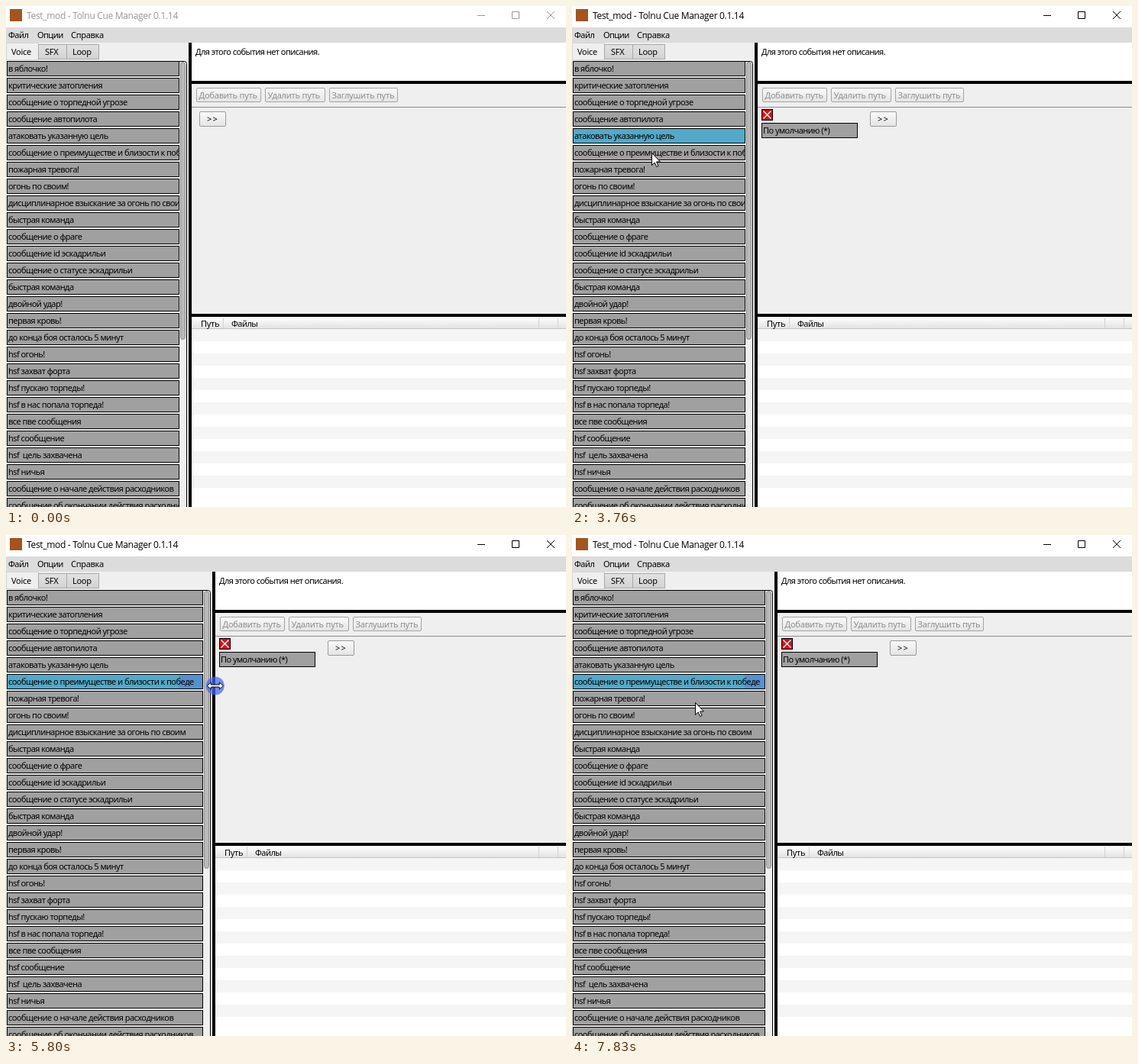
Animation, 733 px wide and 656 px high, one loop 8000 ms. Source, as an HTML page:

```html
<!DOCTYPE html>
<html lang="ru">
<head>
<meta charset="utf-8">
<title>Tolnu Cue Manager</title>
<style>
html, body { margin: 0; width: 100%; height: 100%; overflow: hidden; background: #fff; }
svg { display: block; width: 733px; height: 656px; }
text { font: 11px "Noto Sans", "Open Sans", sans-serif; letter-spacing: -.3px; white-space: pre; }
.title { font: 12px "Open Sans", "Noto Sans", sans-serif; letter-spacing: -.32px; }
.dense { letter-spacing: -.55px; }
.off { fill: #8c8c8c; letter-spacing: -.22px; }
</style>
</head>
<body>
<svg id="stage" viewBox="0 0 733 656">
  <defs>
    <linearGradient id="face" x2="0" y2="1"><stop stop-color="#fafafa"/><stop offset="1" stop-color="#e4e4e4"/></linearGradient>
    <linearGradient id="tab" x2="0" y2="1"><stop stop-color="#e2e2e2"/><stop offset="1" stop-color="#d2d2d2"/></linearGradient>
    <linearGradient id="head" x2="0" y2="1"><stop stop-color="#fff"/><stop offset="1" stop-color="#e3e3e3"/></linearGradient>
    <clipPath id="listClip"><rect id="clipBox" y="70" height="586"/></clipPath>
  </defs>
  <rect width="733" height="656" fill="#fff"/>
  <rect x="5" y="4" width="16" height="16" fill="#a3541f"/>
  <g id="caption">
    <text class="title" x="27" y="17">Test_mod - Tolnu Cue Manager 0.1.14</text>
    <path id="controls" d="M617 12.5h10M662.5 7.5h9v9h-9zM708 7l10 10M718 7l-10 10" fill="none"/>
  </g>
  <rect y="28" width="733" height="20" fill="#dcdcdc"/>
  <g id="menu"></g>
  <g id="right">
    <rect x="239" y="102" width="494" height="301" fill="#efefef"/>
    <path d="M239 132.5H733" stroke="#8c8c8c"/>
    <rect x="239" y="407" width="494" height="15" fill="url(#head)"/>
    <path d="M239 422.5H733" stroke="#c4c4c4"/>
    <path d="M697.5 408v14M722.5 408v14" stroke="#d2d2d2"/>
    <g id="stripes" fill="#f5f5f5"></g>
    <path d="M239 100H733M239 405H733" stroke="#000" stroke-width="4"/>
  </g>
  <g id="content">
    <path d="M284.5 408v14" stroke="#d2d2d2"/>
    <g id="labels"></g>
    <g id="entry">
      <rect x="248.5" y="135.5" width="14" height="14" fill="#d8101c" stroke="#000"/>
      <path d="M250.5 137.5l10 10M260.5 137.5l-10 10" stroke="#fff" stroke-width="1.4"/>
      <rect x="248.5" y="153.5" width="125" height="19" fill="#a0a0a0" stroke="#000"/>
      <text class="dense" x="250" y="167">По умолчанию (*)</text>
    </g>
    <g id="next">
      <rect x="253.5" y="138.5" width="34" height="19" rx="1.5" fill="url(#face)" stroke="#9a9a9a"/>
      <text x="263" y="152" style="letter-spacing:1.2px">&gt;&gt;</text>
    </g>
  </g>
  <rect id="leftBg" y="48" height="608" fill="#efefef"/>
  <g id="tabs"></g>
  <g id="list" clip-path="url(#listClip)"></g>
  <g id="edge">
    <path d="M227 72.5h6.5q3 0 3 3V656" fill="none" stroke="#000"/>
    <rect x="228.5" y="73.5" width="6" height="363" rx="3" fill="#b9b9b9" stroke="#8c8c8c"/>
    <rect x="239" y="48" width="4" height="608"/>
  </g>
  <circle id="press" r="12" fill="#3f68f0" fill-opacity=".72"/>
  <path id="arrow" d="M.5.5V16.5L4.2 13 6.7 18.5 9 17.5 6.6 12H11.5Z" fill="#fff" stroke="#000"/>
  <path id="resize" d="M-10.5 0l5-4.5v3h11v-3l5 4.5-5 4.5v-3h-11v3z" fill="#fff" stroke="#000"/>
</svg>
<script>
const $ = id => document.getElementById(id);
const LOOP = 8000;
const BLUE = '#52a9c8', GRAY = '#a0a0a0';

function add(parent, tag, attrs, content) {
  const el = document.createElementNS('http://www.w3.org/2000/svg', tag);
  for (const k in attrs) el.setAttribute(k, attrs[k]);
  if (content) el.textContent = content;
  parent.appendChild(el);
  return el;
}
const label = (parent, x, y, content, cls = '') => add(parent, 'text', { x, y, class: cls }, content);
const show = (el, on) => el.setAttribute('visibility', on ? 'visible' : 'hidden');
const move = (el, x, y = 0) => el.setAttribute('transform', `translate(${x} ${y})`);

label($('menu'), 3, 42, 'Файл', 'dense');
label($('menu'), 41, 42, 'Опции', 'dense');
label($('menu'), 85, 42, 'Справка');

[['Voice', 0, 42, 7], ['SFX', 42, 37, 51], ['Loop', 79, 42, 87]].forEach(([name, x, w, tx], i) => {
  add($('tabs'), 'rect', {
    x: x + .5, y: i ? 50.5 : 48.5, width: w, height: i ? 19 : 22,
    fill: i ? 'url(#tab)' : '#efefef', stroke: i ? '#a8a8a8' : '#d4d4d4'
  });
  label($('tabs'), tx, 64, name, 'tab');
});

for (let i = 0; i < 7; i++) add($('stripes'), 'rect', { x: 239, y: 423 + i * 32, width: 494, height: 16 });

label($('labels'), 248, 64, 'Для этого события нет описания.', 'dense');
[['Добавить путь', 249, 85], ['Удалить путь', 339, 79], ['Заглушить путь', 423, 90]].forEach(([name, x, w]) => {
  add($('labels'), 'rect', { x: x + .5, y: 107.5, width: w - 1, height: 18, rx: 1.5, fill: 'url(#face)', stroke: '#a4a4a4' });
  label($('labels'), x + 3.5, 121, name, 'off');
});
label($('labels'), 255, 420, 'Путь');
label($('labels'), 295, 420, 'Файлы', 'dense');

const events = `в яблочко!
критические затопления
сообщение о торпедной угрозе
сообщение автопилота
атаковать указанную цель
сообщение о преимуществе и близости к победе
пожарная тревога!
огонь по своим!
дисциплинарное взыскание за огонь по своим
быстрая команда
сообщение о фраге
сообщение id эскадрильи
сообщение о статусе эскадрильи
быстрая команда
двойной удар!
первая кровь!
до конца боя осталось 5 минут
hsf огонь!
hsf захват форта
hsf пускаю торпеды!
hsf в нас попала торпеда!
все пве сообщения
hsf сообщение
hsf  цель захвачена
hsf ничья
сообщение о начале действия расходников
сообщение об окончании действия расходников`.split('\n');

let tint;
const rows = events.map((name, i) => {
  const y = 72 + i * 22;
  const box = add($('list'), 'rect', { x: 1.5, y: y + .5, height: 19, stroke: '#000' });
  if (i === 5) tint = add($('list'), 'rect', { x: 226, y: y + 1, height: 18, fill: '#5890cc' });
  label($('list'), 3, y + 14, name, 'dense');
  return box;
});

// start, end, steps, first position, last position, ease-out power
const moves = [
  [300, 1100, 11, 630, 626, 106, 114, 1.6],
  [1160, 1480, 5, 105, 109, 99, 81, 1.3],
  [2180, 2510, 5, 98, 89, 95, 160, 1.3],
  [3200, 3370, 3, 97, 170, 104, 192, 1.2],
  [4150, 4620, 7, 112, 194, 242, 197, 1.4],
  [5320, 5880, 8, 244, 197.5, 275.5, 197.5, 1.5],
  [6490, 6640, 3, 268.5, 198.5, 266.5, 199, 1],
  [6830, 6830, 1, 265.5, 199, 265.5, 199, 1],
  [7120, 7830, 10, 264, 200, 161, 219, 1.4]
];
const presses = [[1630, 1720], [2900, 2970], [3670, 3760], [5170, 7120]];

function pointer(t) {
  const m = moves.filter(m => t >= m[0]).pop();
  if (!m) return null;
  const [start, end, steps, x0, y0, x1, y1, power] = m;
  const last = steps - 1;
  const step = last ? Math.min(last, Math.floor((t - start) / (end - start) * last + .14)) : 0;
  const p = last ? 1 - (1 - step / last) ** power : 1;
  return [x0 + (x1 - x0) * p, y0 + (y1 - y0) * p];
}

function splitShift(t, x) {
  if (t < 5320) return 0;
  if (t < 6490) return Math.round(x - 242.5);
  return t < 6560 ? 30 : t < 6640 ? 28 : t < 6830 ? 27 : 26;
}

function draw(t) {
  const pos = pointer(t);
  const [x, y] = pos || [0, 0];
  const dx = splitShift(t, x);
  const selected = t < 1720 ? -1 : t < 2970 ? 0 : t < 3840 ? 4 : 5;
  const sizing = t >= 4615 && t < 6490;

  $('caption').setAttribute('fill', t < 1630 ? '#999' : '#000');
  $('controls').setAttribute('stroke', t < 1630 ? '#999' : '#000');
  show($('entry'), selected >= 0);
  move($('next'), selected >= 0 ? 137 : 0);

  move($('content'), dx);
  move($('edge'), dx);
  $('leftBg').setAttribute('width', 239 + dx);
  $('clipBox').setAttribute('width', 227 + dx);
  rows.forEach((row, i) => {
    row.setAttribute('width', 225 + dx);
    row.setAttribute('fill', i === selected ? BLUE : GRAY);
  });
  tint.setAttribute('width', dx);
  show(tint, dx > 0);

  show($('press'), presses.some(([a, b]) => t >= a && t < b));
  move($('press'), x, y);
  show($('arrow'), pos && !sizing);
  move($('arrow'), Math.round(x), Math.round(y));
  show($('resize'), sizing);
  move($('resize'), x, y);
}

function tick() {
  draw(performance.now() % LOOP);
  requestAnimationFrame(tick);
}
tick();
</script>
</body>
</html>
```
